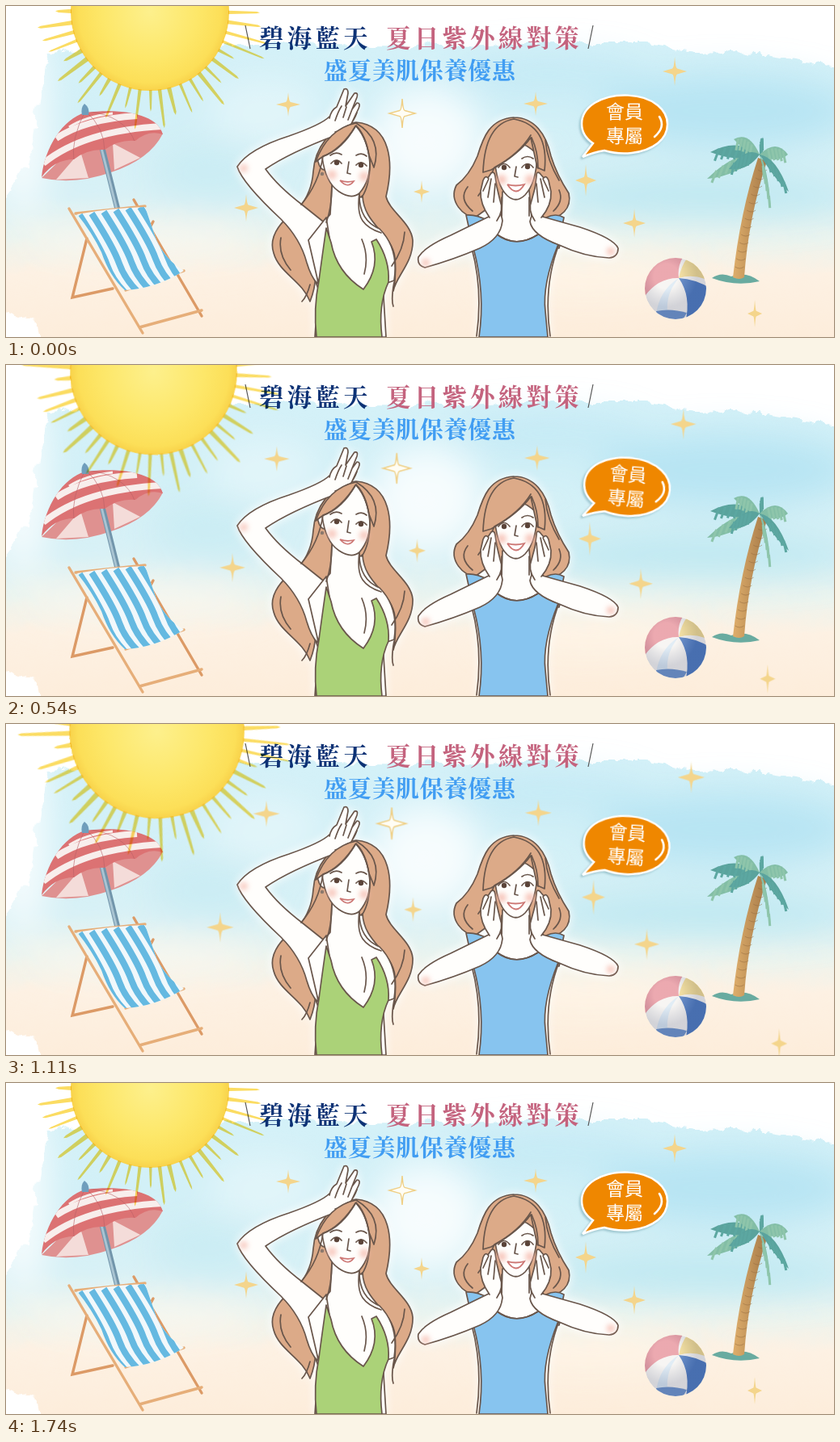
Animation of 1024 by 410 pixels, one loop 1770 ms. Source, as an HTML page:

```html
<!DOCTYPE html>
<html lang="zh-Hant">
<head>
<meta charset="utf-8">
<title>夏日</title>
<style>
html, body { margin: 0; width: 100%; height: 100%; overflow: hidden; background: #fff; }
svg { display: block; width: 100%; height: 100%; }
.serif { font: 700 30.5px "Noto Serif CJK TC", "Noto Serif TC", "Noto Serif CJK JP", "Noto Sans CJK TC", serif; }
.serif .small { font-size: 29px; }
.sans { font: 500 23px "Noto Sans CJK TC", "Noto Sans CJK JP", sans-serif; }
.line { fill: none; stroke: #69564b; stroke-width: 1.7; stroke-linecap: round; stroke-linejoin: round; }
.skin { fill: #fffefc; }
.hair { fill: #dcaa88; }
.skin, .hair, .top { stroke: #69564b; stroke-width: 1.7; stroke-linejoin: round; stroke-linecap: round; }
.figure { filter: drop-shadow(0 0 6px #fff); }
.wood { fill: none; stroke: #e6ae79; stroke-width: 3.4; stroke-linecap: round; }
#rays { mix-blend-mode: multiply; }
</style>
</head>
<body>
<svg viewBox="0 0 1024 410" preserveAspectRatio="none">
<defs>
  <linearGradient id="wash" x2="0" y2="1">
    <stop offset="0" stop-color="#d4f1f8"/><stop offset=".22" stop-color="#d2f0f7"/>
    <stop offset=".5" stop-color="#d8f1f6"/><stop offset=".63" stop-color="#ebf4ef"/>
    <stop offset=".75" stop-color="#fdf1e3"/><stop offset="1" stop-color="#fdecd9"/>
  </linearGradient>
  <radialGradient id="disc">
    <stop offset="0" stop-color="#fdf08c"/><stop offset=".6" stop-color="#fde769"/>
    <stop offset=".9" stop-color="#fcdf58"/><stop offset="1" stop-color="#f8d24a"/>
  </radialGradient>
  <linearGradient id="trunk"><stop stop-color="#dfae6b"/><stop offset="1" stop-color="#a57a49"/></linearGradient>
  <radialGradient id="shade" cx=".35" cy=".3"><stop offset=".4" stop-color="#fff" stop-opacity=".2"/><stop offset="1" stop-color="#35406a" stop-opacity=".18"/></radialGradient>
  <filter id="rough" x="-5%" y="-5%" width="110%" height="110%">
    <feTurbulence baseFrequency=".035" numOctaves="3" seed="4"/>
    <feDisplacementMap in="SourceGraphic" scale="14" xChannelSelector="R" yChannelSelector="G"/>
  </filter>
  <filter id="soft" x="-50%" y="-50%" width="200%" height="200%"><feGaussianBlur stdDeviation="22"/></filter>
  <filter id="blush" x="-50%" y="-50%" width="200%" height="200%"><feGaussianBlur stdDeviation="3"/></filter>
  <clipPath id="canopy"><path d="M98 132C70 140 48 175 44 212Q60 190 84 190Q100 177 122 178Q140 165 160 167Q176 153 194 159C188 136 150 126 98 132"/></clipPath>
  <clipPath id="cloth"><path d="M88 258Q130 250 172 249L186 290Q198 315 220 328Q185 350 147 352Q128 335 118 305Q106 280 88 258"/></clipPath>
  <clipPath id="ball"><circle cx="828" cy="350" r="38"/></clipPath>
</defs>

<!-- watercolour backdrop -->
<g filter="url(#rough)">
  <path d="M48 56L120 46L300 44L500 48L620 44L790 44L850 54L930 56L1040 74V425H44L36 386L-10 374V240L26 190Z" fill="url(#wash)"/>
</g>
<g filter="url(#soft)">
  <ellipse cx="890" cy="130" rx="160" ry="45" fill="#a9dff1" opacity=".65"/>
  <ellipse cx="860" cy="236" rx="190" ry="24" fill="#b4e4ef" opacity=".75"/>
  <ellipse cx="670" cy="85" rx="120" ry="22" fill="#b4e4f3" opacity=".5"/>
  <ellipse cx="520" cy="165" rx="70" ry="65" fill="#fff" opacity=".8"/>
  <ellipse cx="320" cy="130" rx="70" ry="40" fill="#fff" opacity=".35"/>
  <ellipse cx="250" cy="205" rx="70" ry="35" fill="#c0e9f2" opacity=".5"/>
  <ellipse cx="20" cy="140" rx="32" ry="120" fill="#fff" opacity=".8"/>
  <ellipse cx="170" cy="290" rx="150" ry="26" fill="#fff8ee" opacity=".6"/>
  <ellipse cx="720" cy="330" rx="130" ry="30" fill="#fff7ea" opacity=".5"/>
</g>

<g id="disc-part"><circle r="98" fill="url(#disc)"/></g>

<!-- parasol -->
<path d="M44 213Q85 222 130 206Q178 190 194 158L160 150L84 174Z" fill="#df9190"/>
<path d="M62 215L92 180L102 213ZM134 203L132 170L166 188Z" fill="#f4dcd9"/>
<path d="M118 172L138 252" stroke="#7295ab" stroke-width="7"/>
<path d="M117 172L137 252" stroke="#a9c4d2" stroke-width="3"/>
<g clip-path="url(#canopy)">
  <path d="M40 120H200V220H40Z" fill="#dc7273"/>
  <g fill="none" stroke="#f8eeec" stroke-width="8">
    <path d="M62 164Q98 140 162 136M46 195Q96 154 194 149"/>
    <path d="M78 150Q98 137 132 133" stroke-width="3"/>
  </g>
  <path d="M98 130Q80 165 84 192M98 130Q122 150 122 180M98 130Q148 135 160 170" fill="none" stroke="#b85f67" stroke-opacity=".6"/>
</g>
<path d="M94 135Q92 126 97 121Q104 126 102 135Z" fill="#6f9ebc"/>

<!-- deck chair -->
<g class="wood">
  <path d="M158 240L242 384M182 267L166 296M100 288L82 361L132 350" stroke="#dc9a66"/>
  <path d="M78 251L169 405M86 257L172 248M165 398L242 377M148 352L220 328"/>
</g>
<g clip-path="url(#cloth)">
  <path d="M80 240H225V360H80Z" fill="#f1f8fb"/>
  <g id="stripes" fill="none" stroke="#65b9e1" stroke-width="8"></g>
</g>

<!-- palm tree -->
<path d="M873 337Q884 329 897 335Q915 328 932 341Q902 348 873 337" fill="#69aba0"/>
<path d="M930 188Q908 256 899 336Q907 340 913 336Q918 264 941 192Z" fill="url(#trunk)"/>
<path id="rings" fill="none" stroke="#936a3e" stroke-opacity=".5"/>
<g id="leaves"></g>

<!-- beach ball -->
<g clip-path="url(#ball)">
  <circle cx="828" cy="350" r="38" fill="#f5f3f0"/>
  <path d="M832 337Q806 336 788 362L780 320L810 300L838 310Q830 322 832 337" fill="#e7949c"/>
  <path d="M832 337Q836 318 846 308L872 332L864 338Q848 332 832 337" fill="#f3db90"/>
  <path d="M832 337Q852 338 872 350L860 378L840 392Q848 360 832 337" fill="#4c79bf"/>
  <path d="M832 337Q808 352 804 382L820 392Q812 360 832 337" fill="#dae8f3"/>
  <path d="M804 378Q822 374 842 380L834 394L806 388Z" fill="#6d93cb"/>
  <circle cx="828" cy="350" r="38" fill="url(#shade)"/>
</g>

<g id="stars" fill="#f4d58c"></g>

<!-- woman shading her eyes -->
<g class="figure">
  <path class="hair" d="M433 144C400 148 382 178 380 205Q378 232 362 250C340 266 324 285 331 306C338 331 366 340 376 366Q390 330 374 308L402 260L441 235C442 270 478 282 481 312Q483 334 479 353C482 335 504 318 503 290C501 268 474 254 470 236C480 194 476 148 433 144"/>
  <path class="skin" stroke="none" d="M403 222L401 258Q394 268 380 274Q366 285 374 318L386 350L382 410H470L466 345L480 340Q486 300 462 276Q436 265 437 232Z"/>
  <path class="skin" d="M400 137Q390 147 350 161Q300 177 286 199Q292 219 340 264Q364 288 372 318Q377 335 385 344L396 270L366 246Q336 223 321 202Q350 182 408 160Q428 150 434 132Z"/>
  <path class="skin" stroke="none" d="M374 290L396 262L402 300L386 342Z"/>
  <path class="skin" d="M400 139Q402 129 409 125L418 103Q423 101 423 108L420 124L431 108Q436 107 434 113L428 128L434 120Q439 120 436 127L427 146Q418 154 407 156M407 142Q411 130 415 124M421 125L417 138M428 128L423 141"/>
  <path class="top" fill="#abd278" d="M396 275Q391 310 387 340Q380 375 384 410H465Q460 370 473 342Q475 315 458 289L452 292Q464 322 442 351Q409 330 402 293Z"/>
  <path class="line" d="M403 223Q403 250 396 268M437 232Q434 256 441 266Q448 276 464 281M440 289Q449 310 443 332M480 342Q476 364 479 372M376 345Q372 360 366 366M340 287Q336 308 352 327M493 280Q492 301 477 322"/>
  <path class="skin" d="M392 183Q384 181 386 193Q389 204 395 203"/>
  <circle cx="391" cy="208" r="2.3" fill="#8b786d"/>
  <path class="skin" d="M433 148Q396 165 391 187Q395 219 412 230Q427 240 437 232Q451 216 450 191Q446 162 433 148"/>
  <path class="hair" stroke="none" d="M433 145Q398 152 383 193L391 187Q414 178 433 148Q445 160 449 185L455 200Q466 165 433 145"/>
  <path class="line" d="M432 149Q416 178 392 186Q387 220 365 246M433 149Q448 166 450 195Q450 222 440 237"/>
  <g filter="url(#blush)" fill="#f5b8aa" opacity=".75"><circle cx="403" cy="209" r="6"/><circle cx="443" cy="211" r="6"/><circle cx="294" cy="201" r="5"/></g>
  <path class="line" d="M401 185Q408 180 415 184M433 185Q440 181 446 186M402 195Q409 187 415 195M433 197Q439 190 446 198M424 193L422 207L426 208"/>
  <g fill="#5b4439"><circle cx="409" cy="194" r="3.2"/><circle cx="439" cy="197" r="3.2"/></g>
  <path d="M413 216Q421 219 430 217Q423 227 413 216" fill="#fff" stroke="#cd7774" stroke-width="1.7"/>
</g>

<!-- woman touching her cheeks -->
<g class="figure">
  <path class="hair" d="M628 138C598 140 590 163 583 186Q573 210 557 222C547 242 566 261 580 262L602 246L655 244L666 264C687 264 700 250 696 232Q681 209 674 186C668 158 653 138 628 138"/>
  <path class="skin" stroke="none" d="M614 230L613 260L570 276L578 300H684L690 275L650 262L647 228Z"/>
  <path class="top" stroke="none" fill="#87c4ef" d="M569 259Q582 258 596 266L590 280L606 282Q630 301 658 283L668 262Q680 256 690 262L683 295Q663 345 667 378L670 410H585Q593 355 578 300Z"/>
  <path class="line" d="M606 282Q630 301 658 283M576 300Q590 352 582 409M684 295Q664 347 673 409M613 237V260M647 237V260"/>
  <path class="skin" d="M599 260L550 284Q518 298 510 311Q508 321 518 324Q554 314 586 300Q612 288 614 266Q613 257 607 254Z"/>
  <path class="skin" d="M660 260L710 274Q752 288 757 300Q757 311 746 312Q716 311 684 296Q651 284 648 267Q650 257 655 254Z"/>
  <path class="skin" d="M604 185Q606 222 620 235Q631 245 642 234Q656 219 657 184Q630 155 604 185"/>
  <path class="hair" stroke="none" d="M628 140Q592 146 590 206L600 203Q634 184 649 163L657 200L666 204Q672 148 628 140"/>
  <path class="line" d="M649 160Q634 184 604 200Q597 217 584 235M650 163Q658 180 658 201M667 166Q669 191 684 216M571 224Q559 239 577 254M684 228Q690 242 677 254"/>
  <path class="skin" d="M598 262Q586 245 587 229L590 216Q593 209 596 213L600 207Q604 204 605 211L607 224L611 241Q616 253 607 266M590 229L597 214M596 237L600 214M603 243L605 220"/>
  <path class="skin" d="M662 262Q675 247 674 230L671 216Q668 209 665 213L660 207Q656 204 656 211L654 226L650 241Q645 253 654 266M671 229L664 214M666 237L661 214M658 243L656 220"/>
  <g filter="url(#blush)" fill="#f5b8aa" opacity=".8"><circle cx="613" cy="215" r="6"/><circle cx="648" cy="215" r="6"/><circle cx="519" cy="318" r="5"/><circle cx="748" cy="304" r="5"/></g>
  <path class="line" d="M638 189Q645 184 652 189M609 200Q616 191 623 200M638 200Q645 191 652 200M631 199L629 211L633 212"/>
  <g fill="#5b4439"><circle cx="616" cy="200" r="3.2"/><circle cx="645" cy="199" r="3.2"/></g>
  <path d="M620 221Q630 224 641 221Q631 238 620 221" fill="#fff" stroke="#cd7774" stroke-width="1.8"/>
</g>

<!-- headings -->
<path d="M296 24L302 53M726 24L720 53" stroke="#555" stroke-width="1.2"/>
<g class="serif">
  <text x="313" y="51" letter-spacing="4.2" fill="#0d3275">碧海藍天</text>
  <text x="470" y="51" letter-spacing="4.2" fill="#c4637e">夏日紫外線對策</text>
  <text class="small" x="393" y="91" letter-spacing=".7" fill="#419df2">盛夏美肌保養優惠</text>
</g>

<g id="rays" fill="#fbdc62"></g>

<g id="bubble">
  <path d="M713 187L726 170C708 158 706 134 728 120C752 106 788 108 806 123C822 136 822 157 806 170C788 184 760 185 740 179Q727 181 713 187" fill="#ef8700" stroke="#fff" stroke-width="2.5" style="filter:drop-shadow(-2px 2px 1px #6b9fab80)"/>
  <path d="M808 137Q816 150 802 162" fill="none" stroke="#fff" stroke-width="2.6" stroke-linecap="round"/>
  <g class="sans" fill="#fff"><text x="742" y="139">會員</text><text x="742" y="169">專屬</text></g>
</g>
</svg>

<script>
const LOOP = 1770, PEAK = 1080, REST = 1740, SWING = 870;
const byId = id => document.getElementById(id);
const hash = n => { const v = Math.sin(n * 12.9898) * 43758.5453; return v - Math.floor(v); };

function add(parent, d, attrs = {}) {
  const path = document.createElementNS('http://www.w3.org/2000/svg', 'path');
  for (const [key, value] of Object.entries({ d, ...attrs })) path.setAttribute(key, value);
  parent.append(path);
}

function addRays() {
  const longTips = { 0: 136, 2: 150, 3: 153, 22: 138, 25: 156 };
  for (let i = 0; i < 48; i++) {
    const tip = longTips[i] || 117 + (i % 2) * 16 + hash(i + 3) * 15;
    const half = 1.7 + hash(i + 70) * 1.3;
    const angle = i * 7.5 + (hash(i + 20) - .5) * 2;
    add(byId('rays'), `M97 ${-half}L${tip - 4} ${-half * .6}L${tip} 0L${tip - 4} ${half * .5}L97 ${half}Z`,
      { transform: `rotate(${angle})` });
  }
}

function addStripes() {
  for (let i = 0; i < 6; i++) {
    const x = 91 + i * 15, y = 259 - i * 2;
    add(byId('stripes'), `M${x} ${y}Q${x + 27} ${y + 42} ${x + 34} ${y + 62}T${x + 60} ${y + 100}`);
  }
}

function addPalm() {
  const tips = [[867, 214], [871, 181], [900, 165], [936, 165], [967, 184], [968, 230], [946, 252], [894, 202]];
  tips.forEach(([x, y], i) => {
    const mx = (x + 932) / 2, my = (y + 184) / 2;
    add(byId('leaves'), `M932 184Q${mx + 3} ${my - 20} ${x} ${y}Q${mx + 4} ${my + 12} 932 184`,
      { fill: i % 2 ? '#5aa39d' : '#83bea6' });
    for (let k = .3; k < .95; k += .13) {
      const px = 932 + (x - 932) * k, py = 184 + (y - 184) * k - 32 * k * (1 - k);
      add(byId('leaves'), `M${px} ${py}l${(x - 932) * .09} 15`, { stroke: i % 2 ? '#5ca7a1' : '#8ec5ab', 'stroke-width': 3 });
    }
  });
  let rings = '';
  for (let i = 0; i < 13; i++) {
    const k = i / 13;
    rings += `M${930 - 40 * k + 10 * k * k} ${203 + i * 10}q6 4 11 0`;
  }
  byId('rings').setAttribute('d', rings);
}

function addStars() {
  const stars = [[349, 122, 15, 15], [490, 133, 16, 18, true], [655, 121, 15, 15], [827, 81, 15, 18], [297, 250, 15, 17],
    [514, 230, 10, 14], [717, 216, 13, 20], [777, 269, 14, 18], [926, 381, 9, 17]];
  for (const [x, y, w, h, hollow] of stars) {
    const a = w * .2, b = h * .2;
    add(byId('stars'), `M${x} ${y - h}Q${x + 1} ${y - b} ${x + a} ${y - b}L${x + w} ${y}L${x + a} ${y + b}Q${x + 1} ${y + b} ${x} ${y + h}Q${x - 1} ${y + b} ${x - a} ${y + b}L${x - w} ${y}L${x - a} ${y - b}Q${x - 1} ${y - b} ${x} ${y - h}Z`,
      hollow ? { fill: '#fffdf4', stroke: '#efcf85', 'stroke-width': 1.5 } : {});
  }
}

// Grow steadily, then return a little faster.
function pulse(id, from, to) {
  byId(id).animate([
    { transform: from, offset: 0 }, { transform: to, offset: PEAK / LOOP },
    { transform: from, offset: REST / LOOP }, { transform: from, offset: 1 }
  ], { duration: LOOP, iterations: Infinity });
}

addRays();
addStripes();
addPalm();
addStars();

for (const id of ['disc-part', 'rays'])
  pulse(id, 'translate(178px,7px) rotate(0deg) scale(1)', 'translate(187px,9px) rotate(-10deg) scale(1.11)');

byId('stars').style.transformOrigin = '621px 231px';
pulse('stars', 'scale(1)', 'scale(1.104)');

byId('bubble').style.transformOrigin = '713px 187px';
const swing = [];
for (let i = 0; i <= 59; i++) {
  const time = i * 30;
  const angle = time < REST ? 5 * Math.sin(Math.PI * (time % SWING) / SWING) : 0;
  swing.push({ transform: `rotate(${angle}deg)`, offset: i / 59 });
}
byId('bubble').animate(swing, { duration: LOOP, iterations: Infinity });
</script>
</body>
</html>
```
